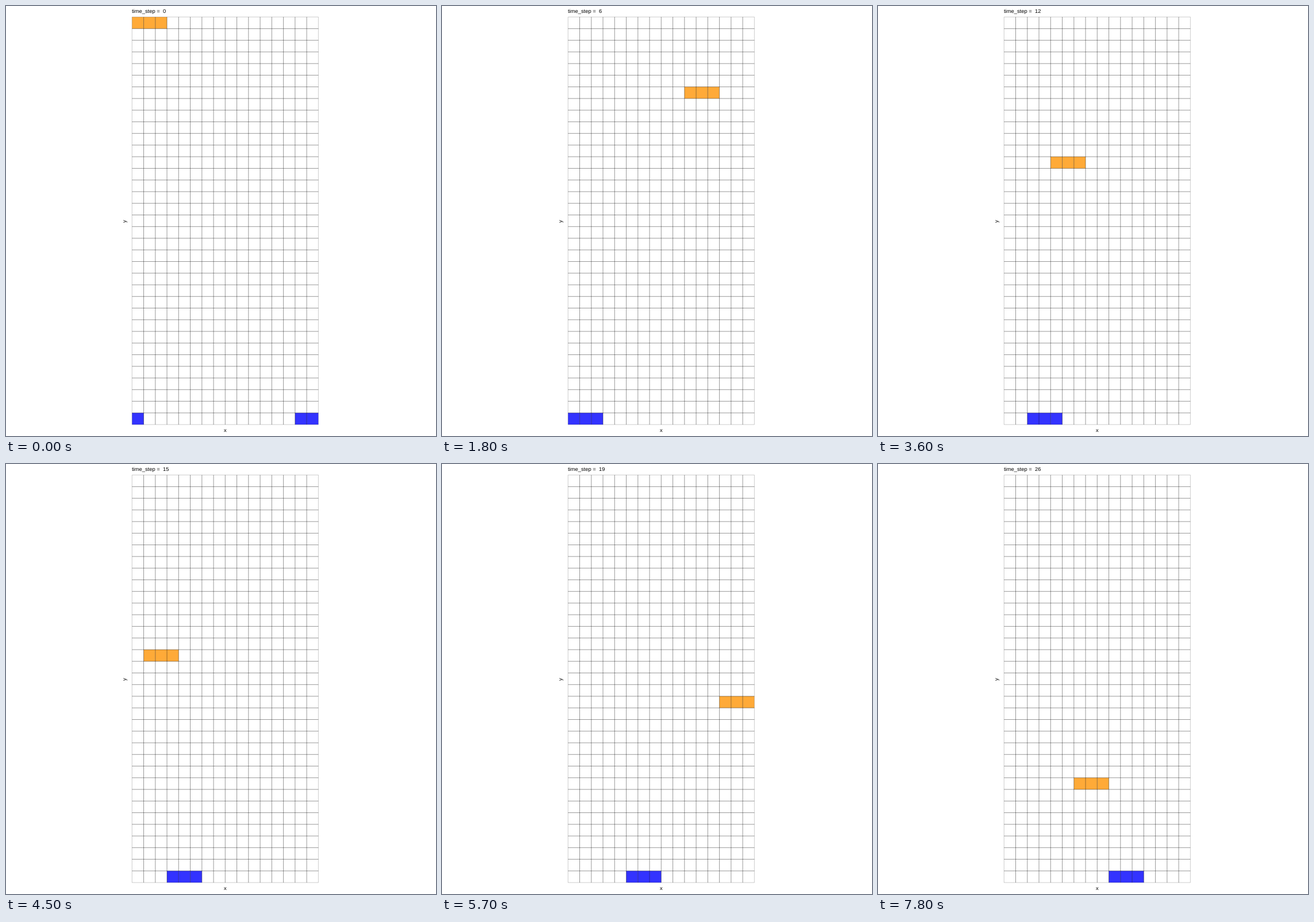
These frames come from a looping animation (748 px wide and 748 px high, 8000 ms). A matplotlib script:

```python
import matplotlib.pyplot as plt
import numpy as np
from matplotlib.animation import FuncAnimation
from matplotlib.patches import Rectangle

plt.rcParams["font.family"] = "Liberation Sans"
plt.rcParams["text.hinting"] = "none"

STAGE, DPI = 748, 88
COLS, ROWS = 16, 35
X0, Y0, CELL = 219.25, 19.1, 20.257
X1, Y1 = X0 + COLS * CELL, Y0 + ROWS * CELL
ORANGE, BLUE = "#ffaa38", "#3333ff"
LENGTH = 3
FRAME_MS, STEP_MS, LOOP_MS = 100, 300, 8000

# Column of the blue block at a few time steps; it drifts right between them.
DRIFT_STEPS = [0, 3, 8, 15, 19, 23, 26]
DRIFT_COLS = [-2, -1, 0, 3, 5, 7, 9]


def points(pixels):
    return pixels * 72 / DPI


fig = plt.figure(figsize=(STAGE / DPI, STAGE / DPI), dpi=DPI, facecolor="white")
ax = fig.add_axes([0, 0, 1, 1])
ax.set_xlim(0, STAGE)
ax.set_ylim(STAGE, 0)
ax.axis("off")


def make_block(color):
    return [ax.add_patch(Rectangle((X0, Y0), CELL, CELL, fc=color, lw=0, snap=False))
            for _ in range(LENGTH)]


def place_block(tiles, col, row):
    for i, tile in enumerate(tiles):
        tile.set_xy((X0 + (col + i) % COLS * CELL, Y0 + row * CELL))


def grid_line(xs, ys, outer):
    ax.plot(xs, ys, color="black", alpha=0.2 if outer else 0.4, lw=points(1),
            solid_capstyle="butt", snap=False, zorder=3)


def label(x, y, text, **kwargs):
    return ax.text(x, y, text, fontsize=points(9.4), color="black", **kwargs)


for c in range(COLS + 1):
    x = X0 + c * CELL
    grid_line([x, x], [Y0, Y1], c in (0, COLS))
for r in range(ROWS + 1):
    y = Y0 + r * CELL
    grid_line([X0, X1], [y, y], r in (0, ROWS))

falling = make_block(ORANGE)
paddle = make_block(BLUE)
title = label(219, 12.2, "", va="baseline")
label(381.3, 741.2, "x", ha="center", va="baseline")
label(212, 374, "y", ha="right", va="center", rotation=90)


def update(frame):
    step = frame * FRAME_MS // STEP_MS
    place_block(falling, -step, step)
    drift = int(np.floor(np.interp(step, DRIFT_STEPS, DRIFT_COLS) + 0.5))
    place_block(paddle, drift, ROWS - 1)
    title.set_text(f"time_step =  {step}")
    return [*falling, *paddle, title]


anim = FuncAnimation(fig, update, frames=LOOP_MS // FRAME_MS, interval=FRAME_MS,
                     repeat=True, repeat_delay=0, blit=False)
plt.show()
```
